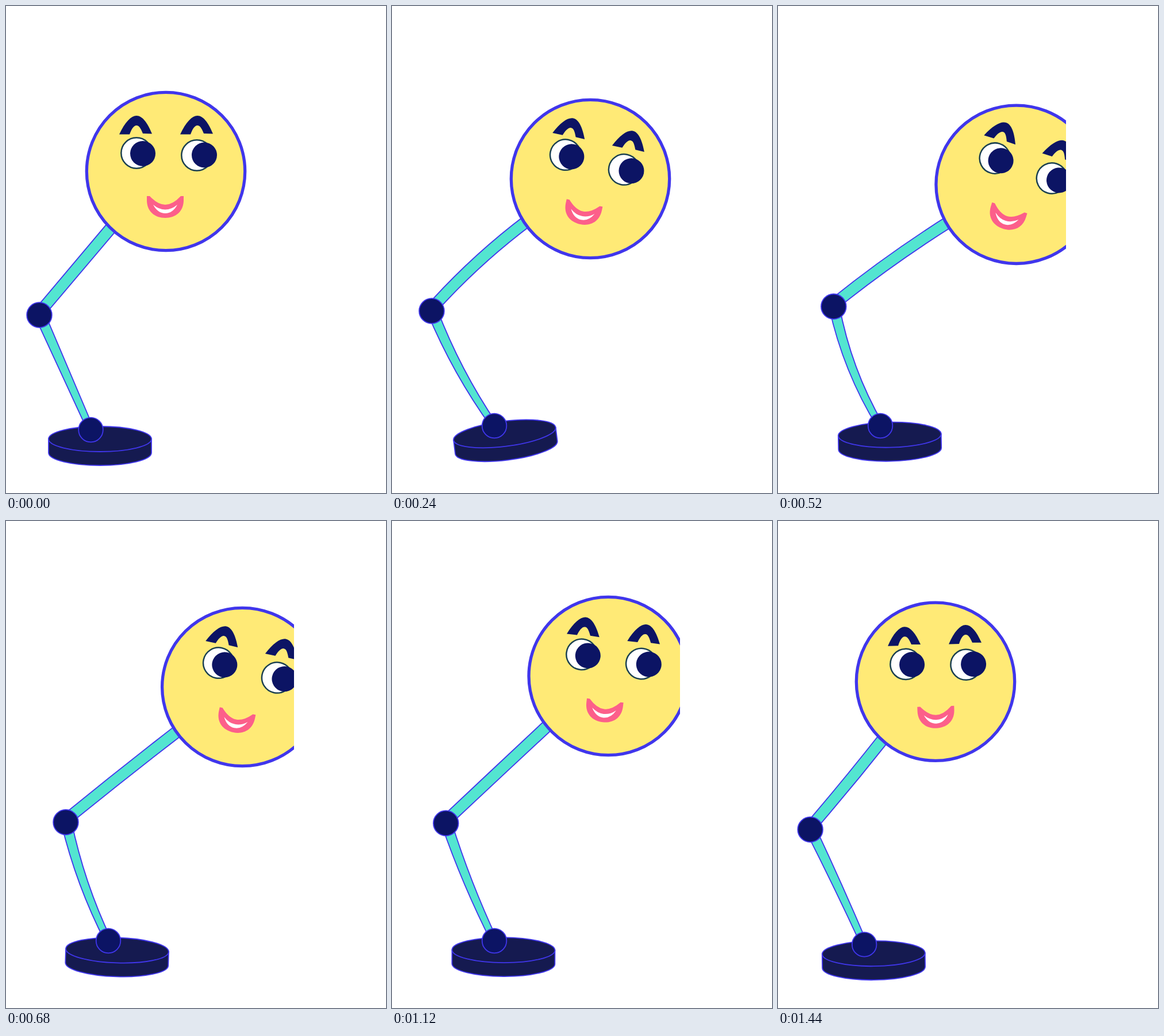
An HTML page that plays this animation: 661 by 848 pixels, repeating every 1.48 s.

```html
<!DOCTYPE html>
<html lang="en">
<head>
<meta charset="utf-8">
<title>Nodding lamp</title>
<style>
  html, body { margin: 0; width: 100%; height: 100%; overflow: hidden; background: #fff; }
  svg { display: block; width: 100vw; height: 100vh; }
  .line { stroke: #4036ec; stroke-width: 1.8; }
  .arm { fill: #53e5d0; }
  .base { fill: #151a50; }
  .navy { fill: #0c1464; }
  .eye { fill: #fff; stroke: #1b4050; stroke-width: 2.5; }
</style>
</head>
<body>
<svg viewBox="0 0 661 848">
  <defs>
    <clipPath id="crop"><rect y="97" width="501" height="751"/></clipPath>
    <path id="brow" class="navy" d="M-81 -64.5C-71 -86 -60 -97 -51 -97C-41 -97 -32 -85 -24 -65.5L-40 -66C-44 -76 -47 -80 -51 -80C-56 -80 -60 -73 -63 -64.5Z"/>
  </defs>
  <g clip-path="url(#crop)">
    <g id="base" class="base line">
      <path d="M-73.5 16V40A89.5 22 0 0 0 105.5 40V16Z"/>
      <ellipse cx="16" cy="16" rx="89.5" ry="22"/>
    </g>
    <path id="lower" class="arm line"/>
    <path id="upper" class="arm line"/>
    <circle id="ankle" class="navy line" r="21.3"/>
    <circle id="knee" class="navy line" r="21.8"/>
    <g id="head">
      <ellipse id="skull" ry="137.7" fill="#ffea76" stroke="#4036ec" stroke-width="5.3"/>
      <g id="face">
        <use href="#brow"/>
        <use href="#brow" x="106"/>
        <circle class="eye" cx="-51" cy="-32" r="26.7"/>
        <circle class="navy" cx="-40" cy="-31" r="22"/>
        <circle class="eye" cx="54" cy="-28" r="26.7"/>
        <circle class="navy" cx="67" cy="-28.5" r="22"/>
        <path fill="#fc5f8a" d="M-33 43H-28Q-14 58 -1 58Q12 58 26 43H31V50C31 70 17 81 -1 81C-19 81 -33 70 -33 50Z"/>
        <path fill="#fff" d="M-22 58Q-12 66.5 -1 66.5Q10 66.5 20 58Q12 73 -1 73Q-14 73 -22 58Z"/>
      </g>
    </g>
  </g>
</svg>
<script>
const LOOP = 1480, STEP = 40;

const pose = (headX, headY, turn, kneeX, kneeY, ankleX) =>
  ({ headX, headY, turn, kneeX, kneeY, ankleX });

const rest   = pose(278, 288, 0, 58, 538, 147.5);
const windUp = pose(266, 228, -8, 52.5, 534, 168);
const lean   = pose(345, 301, 12, 69, 531, 178);
const nod    = pose(422, 343.5, 25, 86, 521.5, 178);
const reach  = pose(413, 289, 12, 104, 524.5, 178);
const rise   = pose(268.5, 213, -9, 63, 531.5, 178);
const settle = pose(262, 255, -7, 50.5, 535, 158);

const timeline = [
  [0, rest], [120, windUp], [240, lean], [400, nod], [600, reach],
  [1080, reach], [1240, rise], [1320, settle], [LOOP, rest]
];

const el = id => document.getElementById(id);
const set = (id, attrs) => {
  for (const k in attrs) el(id).setAttribute(k, attrs[k]);
};
const place = (id, [x, y], turn = 0) =>
  set(id, { transform: `translate(${x} ${y}) rotate(${turn})` });

const DEG = Math.PI / 180;
const heading = (a, b) => Math.atan2(b[1] - a[1], b[0] - a[0]) / DEG;
const distance = (a, b) => Math.hypot(b[0] - a[0], b[1] - a[1]);

function poseAt(t) {
  const i = timeline.findIndex(([time]) => time > t);
  const [t0, a] = timeline[i - 1], [t1, b] = timeline[i];
  const f = (t - t0) / (t1 - t0), p = {};
  for (const k in a) p[k] = a[k] + (b[k] - a[k]) * f;
  return p;
}

// Tapered limb along a quadratic curve
function limb(a, b, bow, wa, wb) {
  const shift = (p, deg, w) =>
    [p[0] - Math.sin(deg * DEG) * w, p[1] + Math.cos(deg * DEG) * w];
  const mid = [(a[0] + b[0]) / 2, (a[1] + b[1]) / 2];
  const dir = heading(a, b);
  const c = shift(mid, dir, bow * 2);
  const side = s => [
    shift(a, heading(a, c), s * wa),
    shift(c, dir, s * (wa + wb) / 2),
    shift(b, heading(c, b), s * wb)
  ];
  const l = side(1), r = side(-1);
  return `M${l[0]}Q${l[1]} ${l[2]}L${r[2]}Q${r[1]} ${r[0]}Z`;
}

// Where the arm meets the head, which turns with it
function neckOf({ headX, headY, turn }) {
  const cos = Math.cos(turn * DEG), sin = Math.sin(turn * DEG);
  return [headX - 90 * cos - 92 * sin, headY - 90 * sin + 92 * cos];
}

function jointsOf(p) {
  return {
    knee: [p.kneeX, p.kneeY],
    shoulder: [p.kneeX, p.kneeY - 4],
    ankle: [p.ankleX, 738 - (p.ankleX - rest.ankleX) * 0.23],
    neck: neckOf(p)
  };
}

const still = jointsOf(rest);
const upperRest = heading(still.shoulder, still.neck);
const lowerRest = heading(still.knee, still.ankle);

function draw(t) {
  const p = poseAt(t), { turn } = p;
  const { knee, shoulder, ankle, neck } = jointsOf(p);
  const stretch = Math.max(0, p.headX - 360) * 0.07;

  // The arms bend and the foot tilts as the head turns against them
  const twist = turn - (heading(shoulder, neck) - upperRest);
  const upperBow = -0.3 * distance(shoulder, neck) * Math.tan(twist * DEG);
  const tilt = heading(knee, ankle) - lowerRest - turn * 0.22;

  place('base', ankle, tilt);
  place('ankle', ankle);
  place('knee', knee);
  place('head', [p.headX, p.headY]);
  set('face', { transform: `rotate(${turn})` });
  set('skull', { cx: -stretch / 2, rx: 137.7 + stretch / 2 });
  set('lower', { d: limb([knee[0] + 1, knee[1]], ankle, turn * 0.55, 9, 5.6) });
  set('upper', { d: limb(shoulder, neck, upperBow, 9.7, 10) });
}

const start = performance.now();
function tick() {
  const t = (performance.now() - start) % LOOP;
  draw(Math.floor(t / STEP) * STEP);
  requestAnimationFrame(tick);
}
tick();
</script>
</body>
</html>
```
